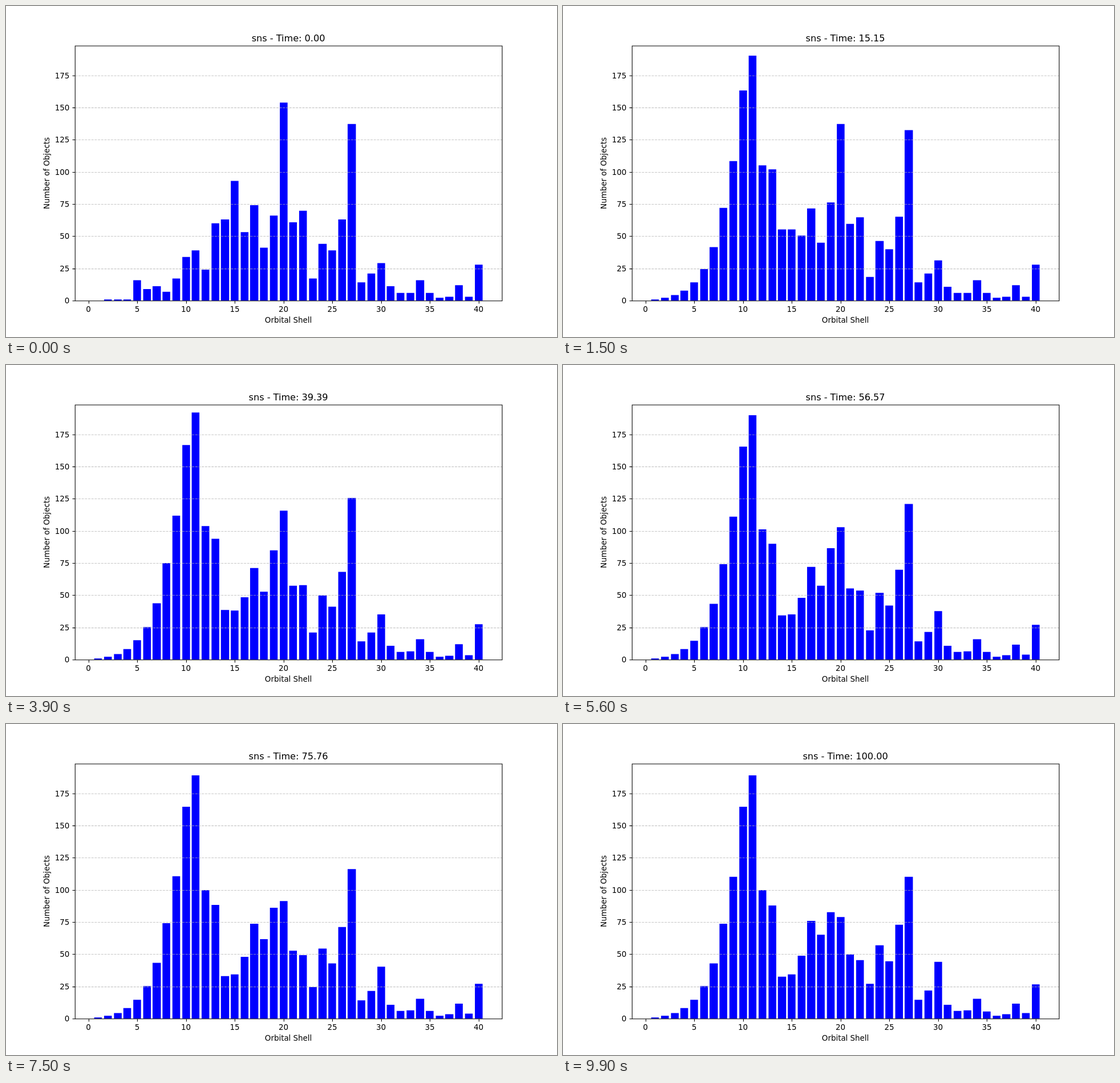
Recreate the animation shown at these times as an HTML page. Size 966 px wide and 580 px high, loop 10000 ms.

```html
<!DOCTYPE html>
<html lang="en">
<head>
<meta charset="utf-8">
<title>Orbital shells</title>
<style>
  html, body { margin: 0; width: 100%; height: 100%; overflow: hidden; background: #fff; }
  svg { display: block; width: 966px; height: 580px; font: 13.89px "DejaVu Sans", sans-serif; }
  .grid { stroke: #b0b0b0; stroke-opacity: .7; stroke-width: 1.11; stroke-dasharray: 4.11 1.78; }
  .axis { fill: none; stroke: #000; stroke-width: 1.11; }
</style>
</head>
<body>
<svg viewBox="0 0 1000 600" preserveAspectRatio="none">
  <path id="bars" fill="#00f"/>
  <g id="axes"></g>
  <text id="title" x="512.5" y="63.7" font-size="16.67" text-anchor="middle"></text>
  <text x="512.5" y="574" text-anchor="middle">Orbital Shell</text>
  <text transform="translate(78.7 303) rotate(-90)" text-anchor="middle">Number of Objects</text>
</svg>
<script>
const STEPS = 100, STEP_MS = 100, YEARS = 100, SHELLS = 40;
const LEFT = 125.5, RIGHT = 900.5, TOP = 72.5, BOTTOM = 534;
const $ = id => document.getElementById(id);
const shellX = i => 149.6 + i * 17.702;
const countY = n => BOTTOM - n * 2.3325;
const snap = v => Math.round(v) + .5;
const yearOf = step => step * YEARS / (STEPS - 1);

// Objects in shells 0-40 at the start
const start = [
  0, 0, 1, 1, 1, 16, 9, 11, 7, 17, 34, 39, 24, 60, 63, 93, 53, 74, 41, 66, 154,
  61, 70, 17, 44, 39, 63, 137, 14, 21, 29, 11, 6, 6, 16, 6, 2, 3, 12, 3, 28
];

// New objects per year, by shell
const launches = {
  10: 19, 11: 50.7, 12: 15.5, 13: 11, 14: 1.1, 15: .39, 16: .22, 17: 1.02, 24: .195, 30: .18
};

// Natural log of the years an object stays in a shell, at a few shells
const logStay = [
  [0, -5.5], [1, -4.6], [3, -3.12], [5, -1.92], [8, -.3], [10, .5], [12, 1.2], [13, 1.8],
  [15, 2.64], [18, 4.22], [20, 4.51], [23, 5.35], [27, 6.04], [32, 7.4], [40, 7.6]
];

function stayYears(i) {
  const k = Math.max(1, logStay.findIndex(([shell]) => shell >= i));
  const [x0, y0] = logStay[k - 1], [x1, y1] = logStay[k];
  return Math.exp(y0 + (y1 - y0) * (i - x0) / (x1 - x0));
}

// Drag moves objects one shell down; implicit steps keep short stays stable
function simulate() {
  const stay = start.map((_, i) => stayYears(i));
  const counts = start.slice(), history = [start];
  const sub = 20, h = yearOf(1) / sub;
  while (history.length < STEPS) {
    for (let s = 0; s < sub; s++) {
      for (let i = SHELLS, falling = 0; i > 0; i--) {
        const gain = falling + (launches[i] ?? 0);
        counts[i] = (counts[i] + h * gain) / (1 + h / stay[i]);
        falling = counts[i] / stay[i];
      }
    }
    history.push(counts.slice());
  }
  return history;
}

function drawAxes() {
  let grid = "", ticks = "", labels = "";
  for (let n = 0; n <= 175; n += 25) {
    const y = snap(countY(n));
    if (n) grid += `M${LEFT} ${y}H${RIGHT}`;
    ticks += `M${LEFT} ${y}h-4.86`;
    labels += `<text x="115.3" y="${countY(n) + 5.2}" text-anchor="end">${n}</text>`;
  }
  for (let i = 0; i <= SHELLS; i += 5) {
    ticks += `M${snap(shellX(i))} ${snap(BOTTOM)}v4.86`;
    labels += `<text x="${shellX(i)}" y="554.7" text-anchor="middle">${i}</text>`;
  }
  const frame = `M${LEFT} ${TOP}H${RIGHT}V${snap(BOTTOM)}H${LEFT}Z`;
  $("axes").innerHTML =
    `<path class="grid" d="${grid}"/><path class="axis" d="${frame}${ticks}"/>${labels}`;
}

const history = simulate();

function draw(step) {
  $("bars").setAttribute("d", history[step].map((n, i) => {
    const left = Math.round(shellX(i - .4)), right = Math.round(shellX(i + .4));
    return `M${left} ${BOTTOM}V${Math.round(countY(n))}H${right}V${BOTTOM}Z`;
  }).join(""));
  $("title").textContent = `sns - Time: ${yearOf(step).toFixed(2)}`;
}

let shown = -1;
function tick() {
  const step = Math.floor(performance.now() / STEP_MS) % STEPS;
  if (step !== shown) draw(shown = step);
  requestAnimationFrame(tick);
}

drawAxes();
tick();
</script>
</body>
</html>
```
